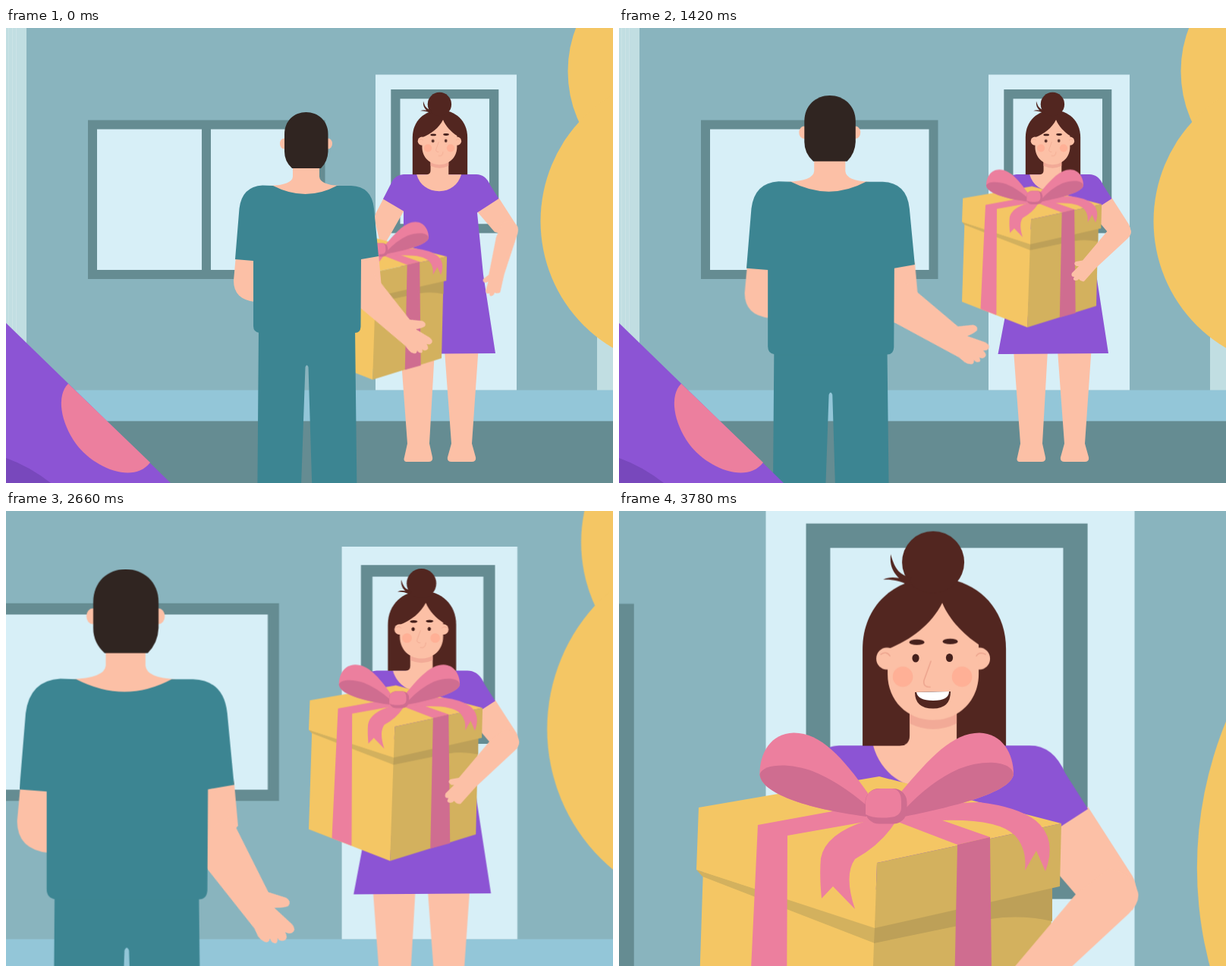
An HTML page without scripts that plays this animation: 800x600 px, repeating every 4000 ms.

```html
<!DOCTYPE html>
<html lang="en">
<head>
<meta charset="utf-8">
<title>Gift delivery</title>
<style>
html, body { margin: 0; width: 100%; height: 100%; overflow: hidden; }
svg { display: block; width: 100vw; height: 100vh; }

.skin { fill: #fcc0a6; }
.teal { fill: #3c8592; }
.purple { fill: #8c54d4; }
.yellow { fill: #f4c664; }
.ochre { fill: #d3b15e; }
.pink { fill: #ec7f9e; }
.rose { fill: #cf6d90; }
.hair { fill: #522620; }
.glass { fill: #d7eff7; }
.frame { fill: #658c92; }
.line { fill: none; stroke: #eda48e; stroke-width: 1.5; stroke-linecap: round; }

#camera, #man, #man-arm, #gift, #her-arm, .open, .shut, #smile, #grin {
  animation: 4s linear infinite;
}
#camera { transform-origin: 669px 121px; animation-name: zoom; }
#man { animation-name: step-back; }
#man-arm { animation-name: reach; }
#gift { animation-name: lift; }
#her-arm { animation-name: hold; }
.open { animation-name: eyes-open; animation-timing-function: step-end; }
.shut { animation-name: eyes-shut; animation-timing-function: step-end; }
#smile { animation-name: smile; animation-timing-function: step-end; }
#grin { transform-origin: 414px 243px; animation-name: grin; }

@keyframes zoom {
  0%, 58.6% { transform: scale(1); animation-timing-function: cubic-bezier(.99, 0, .6, 1); }
  74.08%, 100% { transform: scale(2.613); }
}
@keyframes step-back {
  0%, 21.5% { transform: translate(0, 0) scale(1); animation-timing-function: cubic-bezier(.567, 0, .01, 1); }
  48.5%, 100% { transform: translate(-217.8px, -48.2px) scale(1.203); }
}
@keyframes reach {
  0%, .5% { transform: rotate(46deg) scale(.985); animation-timing-function: cubic-bezier(.5, 0, .2, 1); }
  17%, 21.5% { transform: rotate(-4deg) scale(1.02); animation-timing-function: cubic-bezier(.57, 0, .35, 1); }
  48.5%, 100% { transform: rotate(57.5deg) scale(.965); }
}
@keyframes lift {
  0%, .5% { transform: translate(-55px, 69px); animation-timing-function: cubic-bezier(.5, 0, .2, 1); }
  17%, 100% { transform: translate(0, 0); }
}
@keyframes hold {
  0%, .5% { transform: rotate(-29deg); animation-timing-function: cubic-bezier(.5, 0, .2, 1); }
  17%, 100% { transform: rotate(0deg); }
}
@keyframes eyes-open {
  0%, 55.5%, 94.5%, 100% { opacity: 1; }
  52.5%, 91.5% { opacity: 0; }
}
@keyframes eyes-shut {
  0%, 55.5%, 94.5%, 100% { opacity: 0; }
  52.5%, 91.5% { opacity: 1; }
}
@keyframes smile {
  0% { opacity: 1; }
  78%, 100% { opacity: 0; }
}
@keyframes grin {
  0%, 77.5% { transform: scale(.25, 0); animation-timing-function: ease-in-out; }
  81.5%, 100% { transform: scale(1); }
}
</style>
</head>
<body>
<svg viewBox="0 0 800 600" preserveAspectRatio="none">
<g id="camera">

  <g id="house">
    <rect width="800" height="600" fill="#89b4be"/>
    <path fill="#c1dee2" d="M0 0H27V478H0ZM779 300H800V478H779Z"/>
    <path stroke="#cbe3e6" d="M3.5 0V478M8.5 0V478M13.5 0V478"/>
    <rect y="477.5" width="800" height="41" fill="#93c6d8"/>
    <rect class="frame" y="518.5" width="800" height="82"/>
    <rect class="frame" x="108" y="121.5" width="312.5" height="209.5"/>
    <path class="glass" d="M120 133.5H258V319H120ZM270 133.5H408.5V319H270Z"/>
    <rect class="glass" x="487" y="61.5" width="186" height="416"/>
    <rect class="frame" x="507.3" y="81" width="142" height="189.5"/>
    <rect class="glass" x="519.5" y="93.3" width="117.5" height="165"/>
  </g>

  <g id="woman">
    <g class="skin">
      <path d="M520 425H565L558 548L562 566Q563 572 557 572H529Q523 572 525 566L529 548Z"/>
      <path d="M578 425H622.500L614 548L619 566Q620 572 614 572H587Q581 572 582 566L587 548Z"/>
      <path d="M499 222L487 245Q485 251 487 258L495 292L508 270L525 240Z"/>
      <path d="M620 241L649.500 224L671.800 258.700Q676 266 672 276L644 269Z"/>
    </g>
    <path class="purple" d="M541 193H524Q512 194 508 204L497 225.500L524 241.500V290L508 385L499.500 430L645 429L629 325L621 243.500L649.500 225L638 207Q632 193 620 193Z"/>
    <!-- close-up coordinates for the detailed head -->
    <g transform="translate(669 121) scale(.3827) translate(-669 -121)">
      <path class="hair" d="M321 309.500V182C321 125 363 88 415.500 88S510 125 510 182V309.500Z"/>
      <circle class="hair" cx="414" cy="67.500" r="41"/>
      <path class="hair" d="M380 97C364 86 356 76 358 57C364 78 370 84 386 88ZM348 90.500C358 85 372 88 386 93L382 98C370 92 360 90 348 90.500Z"/>
      <path class="skin" d="M383 255H445V309.500H489C478 345 450 367 413 367C375 367 345 345 335 309.500H370Q383 309 383 296Z"/>
      <path fill="#f2aa97" d="M383 262H445V280Q414 295 383 280Z"/>
      <ellipse class="skin" cx="353" cy="194.500" rx="14" ry="14.500"/>
      <ellipse class="skin" cx="475" cy="194.500" rx="14" ry="14.500"/>
      <path class="skin" d="M426 121C412 149 385 170 354 182V215C354 250 380 275.500 414 275.500S474 250 474 215V176C455 164 435 143 426 121Z"/>
      <path class="line" d="M345 189Q353 184 357 191M471 191Q475 185 483 189M411 198L402 223Q400 232 410 232"/>
      <circle fill="#ffb096" cx="374" cy="218.500" r="13.300"/>
      <circle fill="#ffb096" cx="452" cy="218.500" r="13.300"/>
      <g fill="#45201c">
        <ellipse cx="392.500" cy="173" rx="10" ry="3.700"/>
        <ellipse cx="436.500" cy="172" rx="10" ry="3.700"/>
        <g class="open">
          <ellipse cx="391" cy="194" rx="4.600" ry="5.500"/>
          <ellipse cx="435.500" cy="193.500" rx="4.600" ry="5.500"/>
        </g>
      </g>
      <path class="shut" fill="none" stroke="#45201c" stroke-width="2" d="M385.500 193Q391 201 397 193M430 192.500Q435.500 200.500 441.500 192.500"/>
      <path id="smile" class="line" d="M411 245Q425 249 426 232"/>
      <g id="grin">
        <path class="hair" d="M390 239Q414 238 437 238Q437 260.500 414 260.500Q390 260.500 390 239Z"/>
        <path fill="#fff" d="M392 239L435 238Q435 250 414 250Q394 250 392 239Z"/>
      </g>
    </g>
  </g>

  <g id="gift">
    <g transform="translate(669 121) scale(.3827) translate(-669 -121)">
      <path class="yellow" d="M111 470L102 748L327 836L345 500Z"/>
      <path class="ochre" d="M337 540L327 836L564.500 762.500L571 490Z"/>
      <path class="ochre" d="M102 473L337 549V570L110 482Z"/>
      <path fill="#bda058" d="M337 549L571 496V541Q530 532 490 538L336 570Z"/>
      <path class="yellow" d="M105 391L343 350L583 412L340 464L337 550L102 473Z"/>
      <path class="ochre" d="M340 464L583 412L581 495L337 550Z"/>
      <path class="pink" d="M183 414L325 388L352 405L222 428L220.500 794L166 773Z"/>
      <path class="pink" d="M375 390L489 430L446 440L355 405Z"/>
      <path class="rose" d="M446 440L489 430L493 787L438.500 802Z"/>
      <path class="pink" d="M375 388L475 384Q525 390 549 408Q578 432 562 475L550 448L535 474Q538 446 522 428Q500 405 420 408L375 402Z"/>
      <path class="pink" d="M328 408Q272 425 266 458Q264 480 267 511L282 495L311 525Q296 480 311 459Q345 440 363 412Z"/>
      <path class="pink" d="M328 372C295 325 265 292 230 292.500C200 293 185 320 185.500 347C187 372 245 392 326 403Z"/>
      <path class="rose" d="M185.500 347C190 333 225 332 255 343Q290 357 326 388V403C245 392 187 372 185.500 347Z"/>
      <path class="pink" d="M372 370C410 325 440 292.500 475 292.500C505 293 520 320 520 347C517 370 450 388 378 403Z"/>
      <path class="rose" d="M520 347C517 329 480 327 448 340Q410 357 376 394V403C450 388 517 370 520 347Z"/>
      <rect class="rose" x="324.500" y="366" width="55" height="46.500" rx="18"/>
      <path class="pink" d="M325 400V383Q326 367 345 366H360Q372 367 372 384V392Q371 403 357 404Q336 406 325 400Z"/>
    </g>
  </g>

  <g transform="translate(660 267)">
    <path id="her-arm" class="skin" d="M-16.600 1L-49 39.500L-58 41Q-62 44 -57 47L-54 47L-63 56Q-65 61 -60 61Q-63 66 -58 66Q-55 66 -54 64Q-51 68 -47 67L-31 49L10 11Q16 5 14.700 0Q12 -10 0 -12Z"/>
  </g>

  <g id="man">
    <path class="skin" d="M303 300H328V361Q300 358 300 333Z"/>
    <path class="skin" d="M460 298H491L494.500 337L470 366H460Z"/>
    <g transform="translate(467 342)">
      <path id="man-arm" class="skin" d="M0 -25.500L77 -17.500L90 -28.500Q96 -31 97.500 -26Q97 -22 92 -14.500L113 -20Q120 -21 120 -16Q120 -13 116 -11Q123 -10 122 -6Q121 -2 117 -2Q122 1 119 3Q117 5 113.500 4Q117 8 113 10Q110 12 106 12L98 11L0 21Z"/>
    </g>
    <path class="teal" d="M333 395H460L463 660H405L398.500 447Q396.500 442 394.500 447L387 660H331Z"/>
    <ellipse class="skin" cx="366.500" cy="152.500" rx="5.500" ry="7"/>
    <ellipse class="skin" cx="424.500" cy="152.500" rx="5.500" ry="7"/>
    <path class="skin" d="M378 180H413V196Q414 207 440 208Q396 232 348 208Q377 207 378 196Z"/>
    <path fill="#302521" d="M367 140C367 122 380 111 395.500 111S424.500 122 424.500 140V163Q424 176 415 185H377Q367 176 367 163Z"/>
    <path class="teal" d="M352 208Q395 230 436 208H455Q482 209 485 238L491 301L468 305L467.500 394Q467 402 460 402H334Q326 401 326 393V307L302 305L307.500 238Q311 209 338 207.500Z"/>
  </g>

  <g id="foreground">
    <circle class="yellow" cx="901.500" cy="57" r="161"/>
    <circle class="yellow" cx="898.800" cy="254.800" r="194.300"/>
    <path class="purple" d="M0 389L217 600H0Z"/>
    <path class="pink" d="M82 469C66 485 72 520 92 548C115 580 168 602 190 573Z"/>
    <path fill="#7848bc" d="M0 567Q31 578 59 600H0Z"/>
  </g>

</g>
</svg>
</body>
</html>
```
